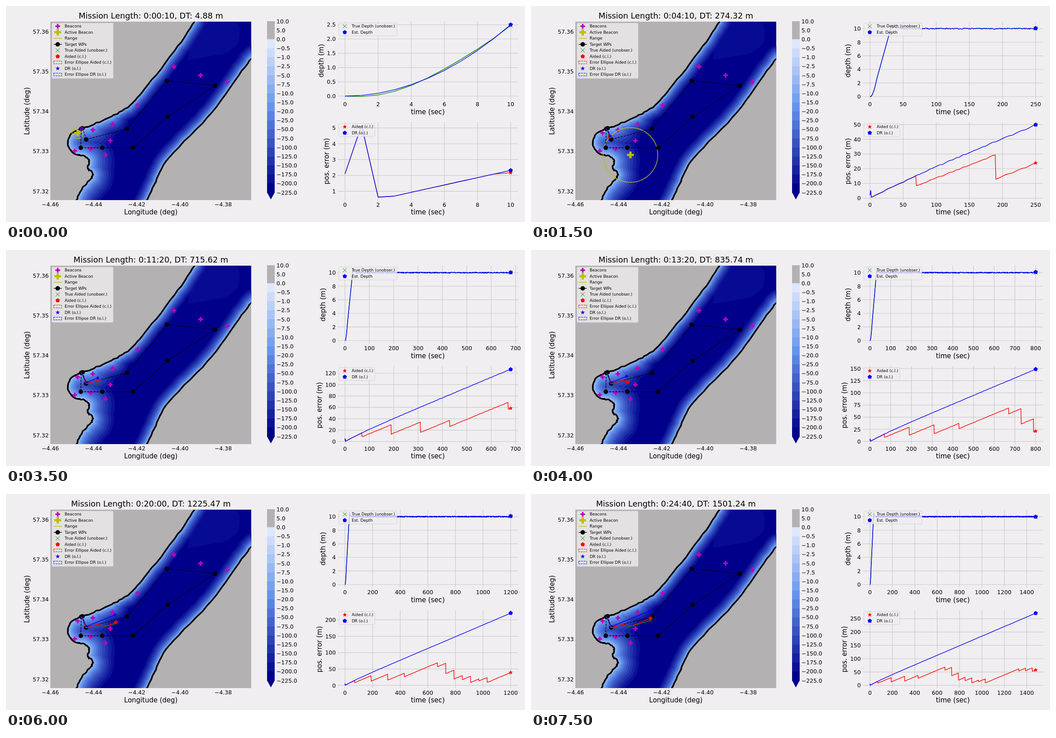
An HTML page with a canvas that plays this animation: 1159 by 483 pixels, repeating every 8 s.

```html
<!DOCTYPE html>
<html lang="en">
<head>
<meta charset="utf-8">
<title>Mission plot</title>
<style>
html, body { margin: 0; width: 100%; height: 100%; overflow: hidden; background: #f0eef0; }
canvas { display: block; }
</style>
</head>
<body>
<canvas id="stage" width="1159" height="483"></canvas>
<script>
const stage = document.getElementById('stage');
const BG = '#f0eef0', LAND = '#b3b1b2', GRID = '#cbcbcb', BLUE = '#0000ff', RED = '#ff0000';
const GREEN = '#008000', MAGENTA = '#bf00bf', YELLOW = '#bfbf00', BLACK = '#000';
const STEP = 500;
// Mission seconds shown, one per step
const times = [10, 70, 180, 250, 330, 430, 560, 680, 800, 890, 970, 1080, 1200, 1290, 1400, 1480];
// In the order in which they ping, one a minute
const beacons = [[160, 284], [153.5, 324], [189, 319.5], [194, 277], [222, 333], [238, 264], [233, 301],
  [294, 222], [375, 135.5], [434.5, 155], [494, 170]];
const waypoints = [[171, 273.5], [179, 298.5], [270.5, 274.5], [359, 167], [467, 178], [361, 247.5],
  [284, 317], [215, 317], [167, 317], [168, 274.5]];
const westCoast = [[424, 30], [384, 90], [318, 176], [278, 221], [235, 247], [190, 267], [150, 283], [138, 307],
  [149, 328], [175, 336], [186, 347], [182, 362], [193, 373], [190, 386], [172, 406], [155, 438]];
const eastCoast = [[552, 113], [513, 164], [450, 249], [364, 338], [334, 392], [313, 438]];

// Key points: mission second, then value or map position
const travelled = [[0, 0], [10, 4.88], [250, 274.32], [430, 465.36], [800, 835.74], [970, 1000.38],
  [1200, 1225.47], [1480, 1501.24]];
const fixes = [[70, 8.3], [190, 13], [310, 16], [430, 26.5], [670, 57], [730, 36], [790, 19.5], [850, 17.5],
  [910, 9], [970, 13.5], [1030, 9], [1330, 54], [1390, 55], [1450, 52.5]];
const trackTrue = [[0, 168, 274], [330, 178.5, 299], [800, 215, 298], [1200, 245, 289.5], [1480, 267, 283]];
const trackAided = [[0, 169, 274], [330, 178.5, 298], [430, 183, 298], [670, 206, 291], [800, 216, 295],
  [970, 228, 294], [1480, 267, 278]];
const trackDR = [[0, 169, 274], [330, 179, 296.5], [1480, 264, 262]];

const fract = x => x - Math.floor(x);
const rand = (i, seed) => fract(Math.sin(i * 12.9898 + seed * 78.233) * 43758.5453) - .5;
const mix = (a, b, u) => a + (b - a) * u;

function lookup(table, t, col = 1) {
  const i = Math.max(1, table.findIndex(row => row[0] >= t));
  const a = table[i - 1], b = table[i];
  return mix(a[col], b[col], (t - a[0]) / (b[0] - a[0]));
}

function wobble(t) {
  const i = Math.floor(t / 5);
  return t > 14 ? mix(rand(i, 1), rand(i + 1, 1), fract(t / 5)) * .7 : 0;
}
function drift(t) {
  if (t < 2) return t ? 5.17 : 2.1;
  return Math.max(.63, .1795 * t + 5 * (1 - Math.exp(-t / 90)));
}
const errorDR = t => drift(t) + wobble(t);
function errorAided(t) {
  const fix = fixes.findLast(f => f[0] <= t);
  return fix ? fix[1] + .177 * (t - fix[0]) + wobble(t) : errorDR(t) - (t > 9) * .15;
}

// Accelerate, dive steadily, overshoot and settle at 10 m
function depth(t) {
  if (t <= 10) return .025 * t * t;
  return t < 33 ? 2.5 + .353 * (t - 10) : 10 + .58 * Math.exp((33 - t) / 4);
}
const estDepth = t => depth(t) + (t > 33 ? rand(t, 11) * .16 : 0);
const trueDepth = t => t > 10 ? estDepth(t) + rand(t, 7) * .03 : depth(t) - .06 * Math.sin(t * .68);

// Catmull-Rom curve through the points, slightly ragged
const SUB = 7;
function coast(pts, seed) {
  const out = [];
  for (let n = 0; n <= (pts.length - 1) * SUB; n++) {
    const i = Math.min(Math.floor(n / SUB), pts.length - 2), u = n / SUB - i;
    const [p, q, r, s] = [i - 1, i, i + 1, i + 2].map(k => pts[Math.max(0, Math.min(pts.length - 1, k))]);
    out.push([0, 1].map(k => q[k] + .5 * u * (r[k] - p[k] + u * (2 * p[k] - 5 * q[k] + 4 * r[k] - s[k]
      + u * (3 * (q[k] - r[k]) + s[k] - p[k]))) + rand(n, seed + k) * 2.2));
  }
  return out;
}

let c = stage.getContext('2d');

function poly(pts, close) {
  c.beginPath();
  pts.forEach(p => c.lineTo(p[0], p[1]));
  if (close) c.closePath();
}
function fill(color) {
  c.fillStyle = color;
  c.fill();
}
function stroke(color, width = 1.4, dash = []) {
  c.strokeStyle = color;
  c.lineWidth = width;
  c.setLineDash(dash);
  c.stroke();
  c.setLineDash([]);
}
function line(pts, color, width, dash) {
  poly(pts);
  stroke(color, width, dash);
}
function box(x, y, w, h, color) {
  c.fillStyle = color;
  c.fillRect(x, y, w, h);
}
function text(s, x, y, size, align = 'center') {
  c.font = size + 'px "DejaVu Sans", sans-serif';
  c.textAlign = align;
  c.fillStyle = BLACK;
  c.fillText(s, x, y + size * .365);
}
function vertical(s, x, y) {
  c.save();
  c.translate(x, y);
  c.rotate(-Math.PI / 2);
  text(s, 0, 0, 15);
  c.restore();
}
function clipMap() {
  c.save();
  c.beginPath();
  c.rect(99, 35, 448.5, 399);
  c.clip();
}

function plus(x, y, s, color) {
  box(x - s / 2, y - s / 6, s, s / 3, color);
  box(x - s / 6, y - s / 2, s / 3, s, color);
}
function dot(x, y) {
  c.beginPath();
  c.arc(x, y, 5, 0, 7);
  fill(BLACK);
}
function radial(x, y, radii, color) {
  const n = 5 * radii.length;
  poly(Array.from({ length: n }, (_, i) => {
    const a = i / n * 2 * Math.PI, r = radii[i % radii.length];
    return [x + r * Math.sin(a), y - r * Math.cos(a)];
  }), true);
  fill(color);
}
const pentagon = (x, y, color, r = 5) => radial(x, y, [r], color);
const star = (x, y, color, r = 5.2) => radial(x, y, [r, r * .4], color);
function cross(x, y, color = GREEN, s = 4.4) {
  line([[x - s, y - s], [x + s, y + s]], color, 1);
  line([[x - s, y + s], [x + s, y - s]], color, 1);
}

function legend(x, y, w, h, textX, rows) {
  c.beginPath();
  c.roundRect(x, y, w, h, 2);
  fill('rgba(240,238,240,.8)');
  stroke('rgba(204,204,204,.8)', 1);
  rows.forEach(([label, mark, color], i) => {
    const cy = y + 7.2 + i * 13.5;
    mark(x + 13, cy, color);
    text(label, textX, cy, 8.93, 'left');
  });
}

// Index 0 is the shallowest water, 16 the deepest
function depthColor(i) {
  const light = [222, 231, 253], mid = [100, 149, 237], deep = [0, 0, 139];
  const rgb = light.map((v, k) => Math.round(i < 7 ? mix(v, mid[k], i / 7) : mix(mid[k], deep[k], (i - 7) / 9)));
  return `rgb(${rgb})`;
}

function drawMap() {
  const west = coast(westCoast, 3), east = coast(eastCoast, 5);
  const bay = 4 * SUB, south = 11 * SUB;
  clipMap();
  box(99, 35, 449, 399, LAND);
  c.save();
  poly([...west, ...east.slice().reverse(), [552, 30]], true);
  c.clip();
  box(99, 35, 449, 399, depthColor(16));
  poly(coast([[405, 120], [490, 105], [520, 75], [510, 35], [420, 30]], 9), true);
  fill(depthColor(15.4));
  c.lineJoin = c.lineCap = 'round';
  // Shelf bands, narrower towards the shore
  for (let i = 15; i > 3; i--) {
    const color = depthColor(i), width = 52 * (i / 15) ** 2.1;
    line(west.slice(0, bay + 1), color, width);
    line(west.slice(bay, bay + SUB + 1), color, width * 1.5);
    line(west.slice(bay + SUB, south + 1), color, width * 2.2);
    line(west.slice(south), color, width * 1.8);
    line(east, color, width);
  }
  c.restore();
  line(west, BLACK, 3.6);
  line(east, BLACK, 3.6);
  c.restore();
}

function drawColorbar() {
  const levels = [10, 5, 0, -.5, -1, -2.5, -5, -7.5];
  for (let v = -10; v >= -25; v -= 5) levels.push(v);
  for (let v = -50; v >= -225; v -= 25) levels.push(v);
  const gap = 383 / (levels.length - 1);
  levels.forEach((v, i) => {
    const y = 34 + i * gap;
    if (v > -225) box(583, y, 17, gap + .5, i < 2 ? LAND : depthColor(i - 2));
    text(v.toFixed(1).replace('-', '−'), 604, y, 12.5, 'left');
  });
  poly([[583, 417], [600, 417], [591.5, 432.5]], true);
  fill(depthColor(16));
}

function drawBackdrop() {
  box(0, 0, 1159, 483, BG);
  drawMap();
  drawColorbar();
  for (let i = 0; i < 5; i++) {
    text('−' + (4.46 - i * .02).toFixed(2), 99 + i * 96.5, 443.5, 12.5);
    text((57.36 - i * .01).toFixed(2), 95.5, 57 + i * 89.3, 12.5, 'right');
  }
  text('Longitude (deg)', 323.5, 461, 15);
  vertical('Latitude (deg)', 47, 235);
}

function drawOverlay(T) {
  const pad = v => String(v).padStart(2, '0');
  const clock = `0:${pad(Math.floor(T / 60))}:${pad(T % 60)}`;
  text(`Mission Length: ${clock}, DT: ${lookup(travelled, T).toFixed(2)} m`, 323.5, 21.5, 17.87);

  const at = table => [lookup(table, T, 1), lookup(table, T, 2)];
  const trail = (table, color) =>
    line([...table.filter(p => p[0] < T).map(p => p.slice(1)), at(table)], color);

  clipMap();
  beacons.forEach(b => plus(...b, 10.5, MAGENTA));
  if (T % 60 === 10) {
    const [x, y] = beacons[Math.floor(T / 60) % beacons.length], [vx, vy] = at(trackTrue);
    plus(x, y, 15, YELLOW);
    c.beginPath();
    c.arc(x, y, Math.hypot(vx - x, vy - y), 0, 7);
    stroke(YELLOW);
  }
  line(waypoints, BLACK, 1.3, [4.8, 2.1]);
  waypoints.forEach(p => dot(...p));
  trail(trackTrue, GREEN);
  trail(trackAided, RED);
  trail(trackDR, BLUE);
  cross(...at(trackTrue), GREEN, 4);
  pentagon(...at(trackAided), RED, 4.7);
  star(...at(trackDR), BLUE, 5);
  c.restore();

  const rule = (x, y, color) => line([[x - 9, y], [x + 9, y]], color);
  const dashBox = (x, y, color) =>
    line([[x - 9, y - 3], [x + 9, y - 3], [x + 9, y + 3], [x - 9, y + 3], [x - 9, y - 3]], color, 1, [4, 1.6]);
  legend(102.5, 38, 137, 124, 131, [
    ['Beacons', (x, y) => plus(x, y, 10.5, MAGENTA)],
    ['Active Beacon', (x, y) => plus(x, y, 15, YELLOW)],
    ['Range', rule, YELLOW],
    ['Target WPs', (x, y) => { rule(x, y, BLACK); dot(x, y); }],
    ['True Aided (unobser.)', cross],
    ['Aided (c.l.)', pentagon, RED],
    ['Error Ellipse Aided (c.l.)', dashBox, RED],
    ['DR (o.l.)', star, BLUE],
    ['Error Ellipse DR (o.l.)', dashBox, BLUE],
  ]);
}

// Smallest round step that keeps the number of intervals within bins
function tickStep(range, bins) {
  const raw = range / bins, mag = 10 ** Math.floor(Math.log10(raw));
  return [1, 2, 2.5, 5, 10].find(s => s * mag >= raw) * mag;
}

function chart(T, top, name, lo, hi, series) {
  const span = 161, height = 177, bottom = top + height, range = hi - lo;
  const sx = t => 757 + 370 * t / T, sy = v => top + 8 + span * (hi - v) / range;
  const xs = tickStep(T * 1.1, 9), ys = tickStep(range * 1.1, 7);
  for (let t = 0; t <= T * 1.05; t += xs) {
    line([[sx(t), top + 1], [sx(t), bottom - 1]], GRID, 1.2);
    text(String(t), sx(t), bottom + 8.5, 12.5);
  }
  let widest = 0;
  for (let k = Math.ceil((lo - range * .05) / ys); k * ys <= hi + range * .05; k++) {
    const y = sy(k * ys), label = (k * ys).toFixed(ys % 1 ? 1 : 0);
    line([[741, y], [1144, y]], GRID, 1.2);
    text(label, 736.5, y, 12.5, 'right');
    widest = Math.max(widest, c.measureText(label).width);
  }
  text('time (sec)', 942, bottom + 25.5, 15);
  vertical(name, 723.5 - widest, top + height / 2);
  for (const [value, color] of series) {
    line(Array.from({ length: T + 1 }, (_, t) => [sx(t), sy(value(t))]), color);
  }
  for (const [value, color, mark] of series) mark(1127, sy(value(T)), color);
}

function drawCharts(T) {
  chart(T, 33.8, 'depth (m)', -.02, T > 33 ? 10.58 : depth(T),
    [[trueDepth, GREEN, cross], [estDepth, BLUE, pentagon]]);
  legend(743.5, 38, 129.5, 29, 772, [['True Depth (unobser.)', cross], ['Est. Depth', pentagon, BLUE]]);
  chart(T, 258.5, 'pos. error (m)', .63, Math.max(drift(1), drift(T)),
    [[errorAided, RED, star], [errorDR, BLUE, pentagon]]);
  legend(743.5, 263, 80, 29, 772, [['Aided (c.l.)', star, RED], ['DR (o.l.)', pentagon, BLUE]]);
}

const backdrop = document.createElement('canvas');
backdrop.width = stage.width;
backdrop.height = stage.height;
const view = c;
c = backdrop.getContext('2d');
drawBackdrop();
c = view;
c.lineJoin = 'round';

let last = -1;
function tick() {
  const i = Math.floor(performance.now() / STEP) % times.length;
  if (i !== last) {
    last = i;
    c.drawImage(backdrop, 0, 0);
    drawOverlay(times[i]);
    drawCharts(times[i]);
  }
  requestAnimationFrame(tick);
}
tick();
</script>
</body>
</html>
```
